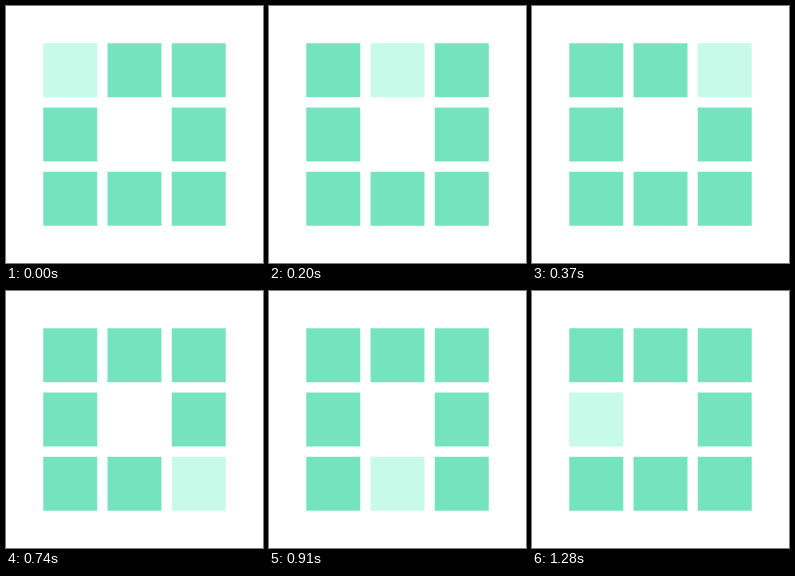
Write an HTML page with a canvas that moves like this. It is 257 px wide and 257 px high and loops after 1.45 s.

```html
<!DOCTYPE html>
<html lang="en">
<head>
<meta charset="utf-8">
<title>Loading blocks</title>
<style>
html, body { margin: 0; width: 100%; height: 100%; overflow: hidden; background: #fff; }
canvas { display: block; width: 100vw; height: 100vh; }
</style>
</head>
<body>
<canvas id="stage"></canvas>
<script>
const STAGE = 257;
const LOOP = 1450;
const BASE = '#75e4be';
const LIT = '#c7fae8';
// Layout on a 100-unit grid
const START = 14.5, PITCH = 25, SIZE = 21;
// Clockwise ring of cells as [column, row]
const RING = [[0, 0], [1, 0], [2, 0], [2, 1], [2, 2], [1, 2], [0, 2], [0, 1]];
// When each cell hands the light to the next
const ENDS = [200, 370, 570, 740, 910, 1110, 1280, LOOP];

const canvas = document.getElementById('stage');
const ctx = canvas.getContext('2d');

function resize() {
  const dpr = window.devicePixelRatio || 1;
  canvas.width = Math.round((innerWidth || STAGE) * dpr);
  canvas.height = Math.round((innerHeight || STAGE) * dpr);
}

function draw(time) {
  const lit = ENDS.findIndex(end => time < end);
  ctx.setTransform(1, 0, 0, 1, 0, 0);
  ctx.fillStyle = '#fff';
  ctx.fillRect(0, 0, canvas.width, canvas.height);
  ctx.scale(canvas.width / 100, canvas.height / 100);
  RING.forEach(([col, row], i) => {
    ctx.fillStyle = i === lit ? LIT : BASE;
    ctx.fillRect(START + col * PITCH, START + row * PITCH, SIZE, SIZE);
  });
}

const began = performance.now();

function tick() {
  draw((performance.now() - began) % LOOP);
  requestAnimationFrame(tick);
}

addEventListener('resize', resize);
resize();
tick();
</script>
</body>
</html>
```
